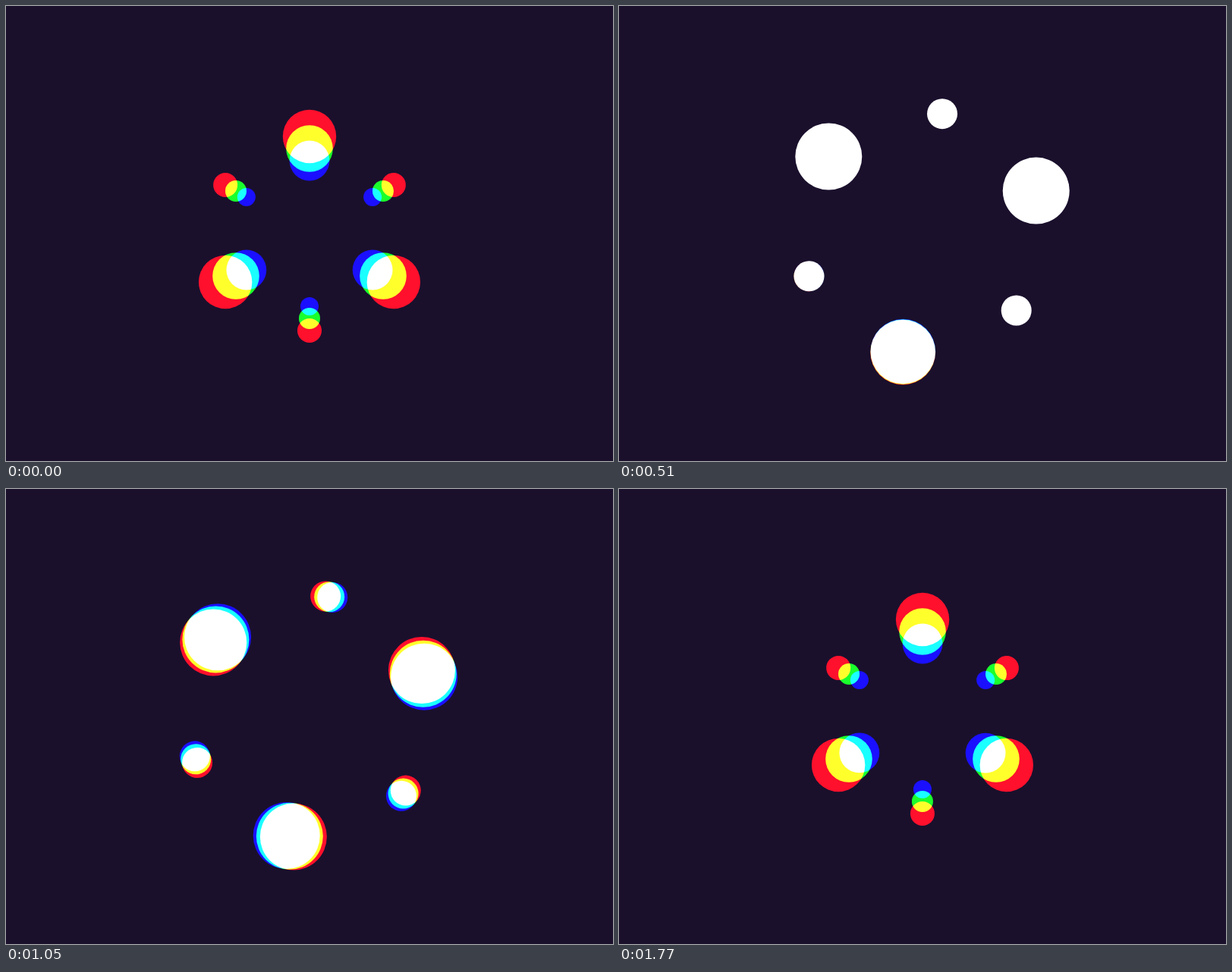
An HTML page for the animation above (1800 ms loop, 800 px wide and 600 px high).

```html
<!DOCTYPE html>
<html lang="en">
<head>
<meta charset="utf-8">
<title>Orbiting dots</title>
<style>
  html, body { margin: 0; width: 100%; height: 100%; overflow: hidden; background: #1a102c; }
  svg { display: block; width: 800px; height: 600px; }
  circle { mix-blend-mode: screen; }
</style>
</head>
<body>
<svg id="stage" viewBox="0 0 800 600">
  <rect width="800" height="600" fill="#1a102c"/>
</svg>
<script>
const LOOP = 1800, HALF = LOOP / 2;
const ORBIT = 160, BIG = 44, SMALL = 20, DOTS = 6;
const SWAY = 15, SPIN = 120;
const GROW_AT = 165, SHRINK_AT = 1060, RESIZE = 260, STAGGER = 28;

// Each colour rests at its own scale and spins over its own time span.
const layers = [
  { color: '#f00', rest: 0.8, start: 627, span: 556 },
  { color: '#0f0', rest: 0.7, start: 655, span: 503 },
  { color: '#00f', rest: 0.6, start: 678, span: 459 }
];

const stage = document.getElementById('stage');
const clamp = x => Math.min(1, Math.max(0, x));
const lerp = (a, b, p) => a + (b - a) * p;
const easeInOut = (x, power) => x < 0.5
  ? Math.pow(2 * x, power) / 2
  : 1 - Math.pow(2 - 2 * x, power) / 2;
const progress = (t, start, span) => easeInOut(clamp((t - start) / span), 3);

for (const layer of layers) {
  layer.dots = Array.from({ length: DOTS }, () => {
    const dot = document.createElementNS('http://www.w3.org/2000/svg', 'circle');
    dot.setAttribute('fill', layer.color);
    return stage.appendChild(dot);
  });
}

function render(t) {
  const sway = SWAY * easeInOut(1 - Math.abs(t - HALF) / HALF, 2);
  for (const { rest, start, span, dots } of layers) {
    const turn = sway + SPIN * progress(t, start, span);
    dots.forEach((dot, i) => {
      const delay = i * STAGGER;
      const grown = progress(t, GROW_AT + delay, RESIZE) - progress(t, SHRINK_AT + delay, RESIZE);
      const [near, far] = i % 2 ? [SMALL, BIG] : [BIG, SMALL];
      const angle = (120 - 60 * i + turn) * Math.PI / 180;
      const distance = ORBIT * lerp(rest, 1, grown);
      dot.setAttribute('cx', 400 + distance * Math.sin(angle));
      dot.setAttribute('cy', 300 - distance * Math.cos(angle));
      dot.setAttribute('r', lerp(near * rest, far, grown));
    });
  }
}

let origin;
function tick(now) {
  origin ??= now;
  render((now - origin) % LOOP);
  requestAnimationFrame(tick);
}
render(0);
requestAnimationFrame(tick);
</script>
</body>
</html>
```
